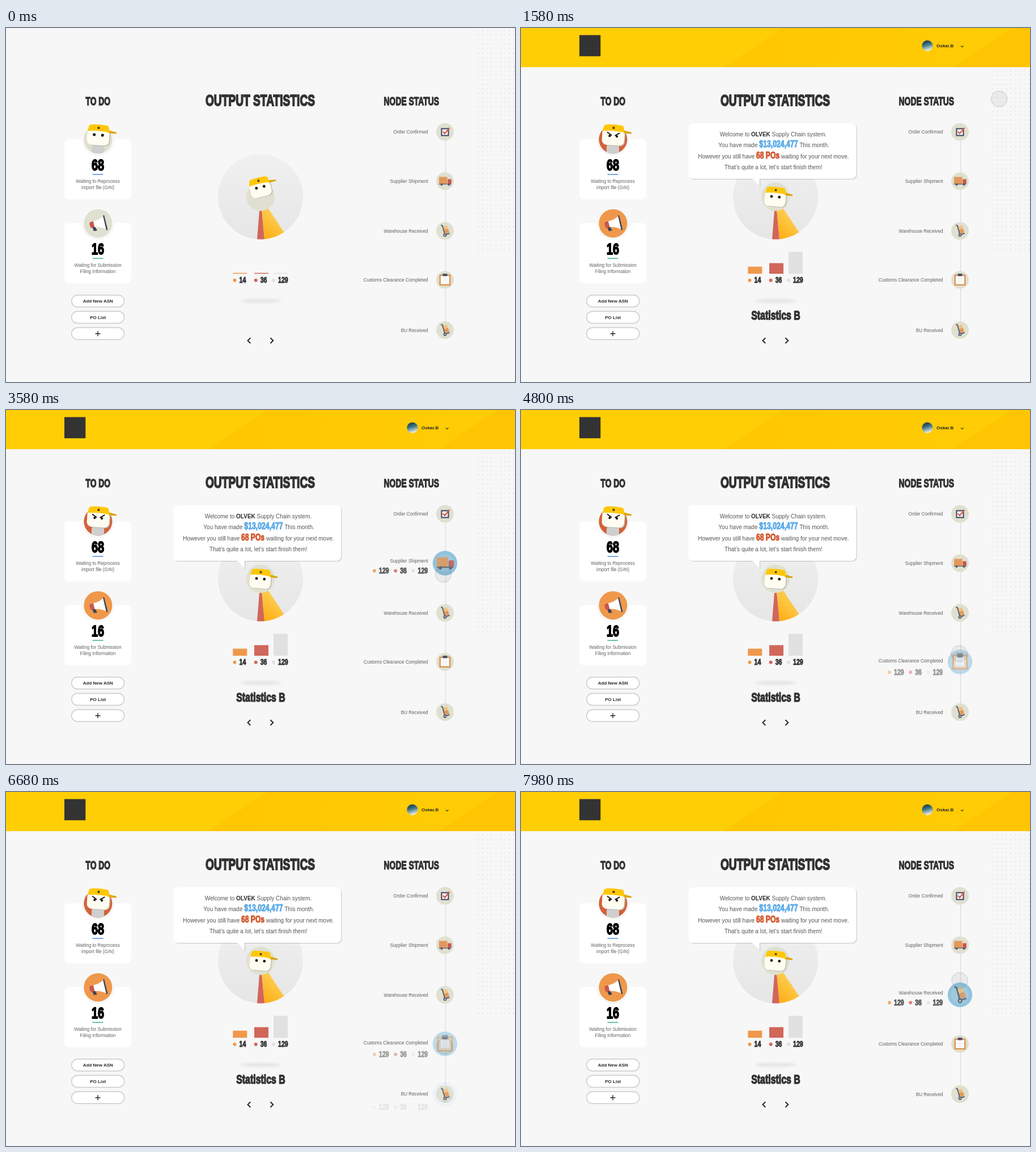
An HTML page that plays this animation: 898x624 px, repeating every 8 s.

```html
<!DOCTYPE html>
<html lang="en">
<head>
<meta charset="utf-8">
<title>Dashboard</title>
<style>
  html, body { margin: 0; width: 100%; height: 100%; overflow: hidden; background: #f7f7f7; }
  svg { display: block; font-family: "Liberation Sans", Arial, sans-serif; }
  .small { font-size: 8.2px; fill: #606060; }
  .bold { font-size: 8px; font-weight: bold; fill: #282828; }
  .speech { font-size: 10px; fill: #555; }
  .heavy { font-weight: bold; stroke-linejoin: miter; stroke-miterlimit: 2; }
  .mid { text-anchor: middle; }
  .end { text-anchor: end; }
</style>
</head>
<body>
<svg id="stage" width="898" height="624" viewBox="0 0 898 624"></svg>
<script>
const BEIGE = '#dfe0d0', ORANGE = '#ef984b', RED = '#d1665a', GREY = '#e1e1e1', DARK = '#333';
const NODE_X = 774.5, HEADER_H = 69, LOOP = 8000, FADE = 320;

// Heavy condensed lettering
const heavy = (text, x, y, size, { anchor = 'start', squeeze = .74, color = DARK } = {}) =>
  `<text class="heavy" transform="translate(${x} ${y}) scale(${squeeze} 1)" font-size="${size}"
    text-anchor="${anchor}" fill="${color}" stroke="${color}" stroke-width="${size * .065}">${text}</text>`;
const heading = (text, x, y, size) => heavy(text, x, y, size, { anchor: 'middle', squeeze: .685 });
const text = (cls, x, y, s) => `<text class="${cls}" x="${x}" y="${y}">${s}</text>`;
const rect = (x, y, w, h, fill, rx = 0, extra = '') =>
  `<rect x="${x}" y="${y}" width="${w}" height="${h}" rx="${rx}" fill="${fill}" ${extra}/>`;
const circle = (x, y, r, fill, extra = '') => `<circle cx="${x}" cy="${y}" r="${r}" fill="${fill}" ${extra}/>`;
const poly = (points, fill) => `<polygon points="${points}" fill="${fill}"/>`;
const path = (d, fill, extra = '') => `<path d="${d}" fill="${fill}" ${extra}/>`;
const stroke = (d, color, width) => path(d, 'none', `stroke="${color}" stroke-width="${width}"`);

const legend = (x, y, gaps, values) => [ORANGE, RED, GREY].map((color, i) =>
  circle(x + gaps[i], y, 3, color) + heavy(values[i], x + gaps[i] + 8, y + 4.4, 14.3)).join('');

const eyes = circle(-6.8, -1, 2.4, '#111') + circle(7, -1, 2.4, '#111');
const angryEyes = circle(-6, 1, 2, '#111') + circle(6, 1, 2, '#111')
  + stroke('M-10.5-5L-2.5 0M10.5-5L2.5 0', '#111', 1.7);
const head = face => rect(-16, -13, 36, 30, '#bdbdb0', 8) + rect(-18.5, -15, 37, 31, '#fffdf1', 8) + face
  + path('M16-10L30-7.5L30-5L17-5Z', '#dca60c')
  + path('M-18.5-6.5L-16.5-15Q-15.5-17.5-12-17.8Q0-19 12-17.8Q15.5-17.5 16.5-15L18.5-6Q0-9.5-18.5-6.5Z', '#ffc708')
  + rect(-2, -14.5, 3.5, 3.5, '#4a3c10');

const icons = {
  check: rect(-6, -5.5, 12, 12, '#fff', 0, 'stroke="#4a5169" stroke-width="2.2"')
    + stroke('M-3.5-.5L-.5 3L8-7', '#d4544e', 2.2),
  truck: rect(-10.5, -7.5, 14.5, 12.5, '#e2985b') + rect(4.8, -3.5, 6.5, 8.5, '#c9574f', 1)
    + rect(-10.5, 4.6, 21, 1.2, '#555b6e')
    + circle(-6, 6, 2, '#555b6e') + circle(7, 6, 2, '#555b6e'),
  dolly: stroke('M-7-10L-4.5-9L0 7L8 4.5', '#555b6e', 2)
    + poly('-3,-8 3.5,-9.5 5,-4 -1.5,-2', '#f0c27d') + poly('-1.5,-2 5.5,-4 7.5,3 .5,5', '#e2985b')
    + circle(0, 7.5, 3, '#555b6e') + circle(0, 7.5, 1.2, '#d5d5d5'),
  clipboard: rect(-10, -9.5, 20, 19.5, '#dd9556', 1.5) + rect(-7.5, -7, 15, 14.5, '#fff')
    + rect(-4, -11, 8, 4.5, '#4a5169', 1) + stroke('M-4.5-2H4.5M-4.5 1H4.5M-4.5 4H4.5', '#dedede', .8),
};
const nodes = [
  { y: 183, label: 'Order Confirmed', icon: icons.check },
  { y: 270, label: 'Supplier Shipment', icon: icons.truck },
  { y: 357.5, label: 'Warehouse Received', icon: icons.dolly },
  { y: 444, label: 'Customs Clearance Completed', icon: icons.clipboard },
  { y: 532.5, label: 'BU Received', icon: icons.dolly },
];
const nodeView = ({ y, label, icon }, i) => `
  ${circle(NODE_X, y, 21.7, '#7ab8d8', `id="halo${i}"`)}
  <g id="plain${i}" transform="translate(${NODE_X} ${y})">${circle(0, 0, 15.5, BEIGE)}${icon}</g>
  <g id="big${i}" transform="translate(${NODE_X} ${y}) scale(1.4)">${icon}</g>
  <g id="label${i}">${text('small end', 744.5, y + 3, label)}</g>
  <g id="counts${i}">${legend(650, y, [0, 37.2, 68.5], [129, 36, 129])}</g>`;

const card = (y, id, hot, number, accent, lines) => `
  ${rect(103, y, 118, 106, '#fff', 8)}${circle(162.4, y + .4, 29, '#f7f7f7')}
  ${circle(162.4, y + .4, 25, BEIGE)}${circle(162.4, y + .4, 25, hot, `id="${id}"`)}
  ${heavy(number, 162, y + 55.2, 27, { anchor: 'middle', color: '#000' })}
  ${rect(152.5, y + 61.4, 19, 1.5, accent)}
  ${lines.map((s, i) => text('small mid', 162, y + 77.4 + i * 10.6, s)).join('')}`;

const button = (y, label) => rect(115.7, y, 93, 21, '#fff', 10.5, 'stroke="#cbcbcb" stroke-width="1.4"')
  + text('bold mid', 162.3, y + 13.4, label);

const bars = [[400.3, 12.5, ORANGE], [438, 18.7, RED], [472, 38.7, GREY]];

stage.innerHTML = `
<defs>
  <linearGradient id="disc" x2="0" y2="1"><stop stop-color="#f0f0f0"/><stop offset="1" stop-color="#e6e6e6"/></linearGradient>
  <linearGradient id="beam" x1=".8" x2=".3" y2="1"><stop offset=".3" stop-color="#fcd45c"/><stop offset="1" stop-color="#ffae17"/></linearGradient>
  <linearGradient id="band"><stop stop-color="#ffc602"/><stop offset="1" stop-color="#ffcd05"/></linearGradient>
  <linearGradient id="photo" x2=".3" y2="1"><stop stop-color="#14283f"/><stop offset=".5" stop-color="#3c7584"/><stop offset="1" stop-color="#e6eae0"/></linearGradient>
  <pattern id="dots" x="829" y="1" width="7.87" height="7.85" patternUnits="userSpaceOnUse">${circle(4, 4, .8, '#d3d3d3')}</pattern>
  <clipPath id="bust"><circle cx="162.4" cy="196.4" r="25"/></clipPath>
  <filter id="blur" x="-20%" y="-100%" width="140%" height="300%"><feGaussianBlur stdDeviation="2"/></filter>
</defs>
${rect(829, 1, 69, 396, 'url(#dots)')}
${heading('TO DO', 162.3, 135.7, 20.3)}
${heading('OUTPUT STATISTICS', 448.5, 136.7, 28)}
${heading('NODE STATUS', 715.3, 135.7, 20.3)}

${card(196, 'hotRobot', '#d4613a', 68, '#4a90e2', ['Waiting to Reprocess', 'import file (GIN)'])}
<g clip-path="url(#bust)">${path('M151 222V210Q151 204 162 204T173 210V222Z', '#cfcfcf')}</g>
<g transform="translate(162.8 189.6) rotate(4) scale(1.06)">
  ${head(`<g id="calm">${eyes}</g><g id="angry">${angryEyes}</g>`)}</g>
${card(344, 'hotHorn', '#ef984b', 16, '#3fb28e', ['Waiting for Submission', 'Filing Information'])}
${poly('152,351 157,350 161,357 155,358', '#3d4359')}
${path('M147.5 342.5L154 340.5L156.5 351L150 352.5Q147 348 147.5 342.5Z', '#c9574f')}
${path('M154 340.5Q165 338.5 172 331L177.5 355.5Q168 350 156.5 351Z', '#fff')}
${poly('171,330.5 173.2,330 179.5,355.5 177,356.5', '#3d4359')}
${button(470.8, 'Add New ASN')}${button(499.5, 'PO List')}${button(528.2, '')}
${stroke('M157.5 538.7H166.5M162 534.2V543.2', '#282828', 1.4)}

${circle(449, 297.5, 75, 'url(#disc)')}
${path('M449 297.5L443 372.3A75 75 0 0 0 456 372.2Z', RED)}
${path('M449 297.5L456 372.2A75 75 0 0 0 490.5 360Z', 'url(#beam)')}
${circle(449, 297.5, 25, BEIGE)}
<g id="mascot">${head(eyes)}</g>
<g id="bubble" style="filter:drop-shadow(1.2px 1.5px .4px #0003)">
  ${rect(295.5, 168, 296, 98, '#fff', 8)}${poly('407,265 421,265 421,279.5', '#fff')}
  ${text('speech mid', 445, 191, 'Welcome to <tspan font-weight="bold" fill="#282828">OLVEK</tspan> Supply Chain system.')}
  ${text('speech end', 417.5, 210.3, 'You have made')}
  ${heavy('$13,024,477', 420.3, 210.1, 16.6, { color: '#5cabe8' })}
  ${text('speech', 491.5, 210.3, 'This month.')}
  ${text('speech end', 412.3, 229.7, 'However you still have')}
  ${heavy('68 POs', 415, 229.5, 16.4, { color: '#d4592f' })}
  ${text('speech', 459, 229.7, 'waiting for your next move.')}
  ${text('speech mid', 445.3, 249, 'That’s quite a lot, let’s start finish them!')}
</g>
${bars.map(([x, , color], i) => rect(x, 0, 25, 0, color, 0, `id="bar${i}"`)).join('')}
${legend(403.5, 444.8, [0, 37.2, 68.5], [14, 36, 129])}
<ellipse cx="449" cy="481" rx="37" ry="3.5" fill="#e4e4e4" filter="url(#blur)"/>
<g id="caption">${heavy('Statistics B', 449.5, 514.3, 21.5, { anchor: 'middle' })}</g>
${stroke('M431.3 546.2L426.5 551L431.3 555.8M466.5 546.2L471.3 551L466.5 555.8', '#282828', 2)}

${rect(775, 183, 1.3, 349, '#dcdcdc')}
${nodes.map(nodeView).join('')}

<g id="header">
  ${rect(0, 0, 898, HEADER_H, '#ffce05')}
  ${poly('358,69 461,0 866,0 763,69', 'url(#band)')}${poly('763,69 866,0 898,0 898,69', '#ffc502')}
  ${rect(103, 12.5, 37.3, 37.3, DARK)}
  ${circle(717, 31.3, 9.6, 'url(#photo)')}
  ${text('bold', 733, 34.2, 'Oskar.B')}
  ${stroke('M776 31.3L778.3 33.6L780.6 31.3', '#443a10', 1.2)}
</g>
${circle(0, 0, 14.2, '#0000000d', 'id="cursor" stroke="#00000030" stroke-width=".8"')}`;

const $ = id => document.getElementById(id);
const ramp = (t, from, to) => Math.min(1, Math.max(0, (t - from) / (to - from)));
const easeOut = (p, power) => 1 - (1 - p) ** power;
const easeInOut = p => p < .5 ? 2 * p * p : 1 - 2 * (1 - p) ** 2;
const show = (id, opacity) => $(id).setAttribute('opacity', opacity);
const place = (id, transform) => $(id).setAttribute('transform', transform);

// [start, duration, x, y] of each cursor move
const moves = [
  [1070, 1030, 774, 183], [2430, 720, 771, 274], [3360, 720, 774, 357], [4300, 720, 773, 446],
  [5220, 720, 774, 534], [6340, 400, 774, 444], [7080, 400, 774, 357], [7830, 400, 774, 270],
];
// [node, on, off]
const hovers = [
  [0, 2000, 2610], [1, 2780, 3520], [2, 3710, 4460], [3, 4650, 5380],
  [4, 5720, 6390], [3, 6536, 7130], [2, 7340, 7916],
];

function cursorAt(t) {
  let x = 912, y = 68;
  moves.forEach(([start, duration, toX, toY], i) => {
    const p = ramp(t, start, start + duration), k = i ? easeInOut(p) : p;
    x += (toX - x) * k;
    y += (toY - y) * k;
  });
  return [x, y];
}

function draw(t) {
  place('header', `translate(0 ${-HEADER_H * (1 - easeOut(ramp(t, 20, 800), 3))})`);
  const drop = easeOut(ramp(t, 20, 370), 3);
  place('mascot', `translate(448.7 ${281.7 + 16.8 * drop}) rotate(${-14 + 19 * drop})`);
  const caption = easeOut(ramp(t, 20, 340), 2);
  show('caption', caption);
  place('caption', `translate(0 ${4 * (1 - caption)})`);

  const bubble = ramp(t, 600, 1000);
  show('bubble', bubble);
  place('bubble', `translate(0 ${8 * (1 - easeOut(bubble, 2))})`);
  const grow = easeOut(ramp(t, 600, 1160), 2);
  bars.forEach(([, full], i) => {
    const height = 1.5 + (full - 1.5) * grow;
    $('bar' + i).setAttribute('y', 433.2 - height);
    $('bar' + i).setAttribute('height', height);
  });
  const heat = ramp(t, 520, 840), anger = ramp(t, 800, 950);
  show('hotRobot', heat);
  show('hotHorn', heat);
  show('calm', 1 - anger);
  show('angry', anger);

  nodes.forEach((node, i) => {
    const p = Math.max(...hovers.filter(([n]) => n === i)
      .map(([, on, off]) => ramp(t, on, on + FADE) - ramp(t, off, off + FADE)));
    for (const part of ['halo', 'big', 'counts']) show(part + i, p);
    show('plain' + i, 1 - p);
    place('label' + i, `translate(0 ${-5 * p})`);
    place('counts' + i, `translate(0 ${24.5 - 13.5 * p})`);
  });
  place('cursor', `translate(${cursorAt(t)})`);
}

const begin = performance.now();
(function tick() {
  draw((performance.now() - begin) % LOOP);
  requestAnimationFrame(tick);
})();
</script>
</body>
</html>
```
